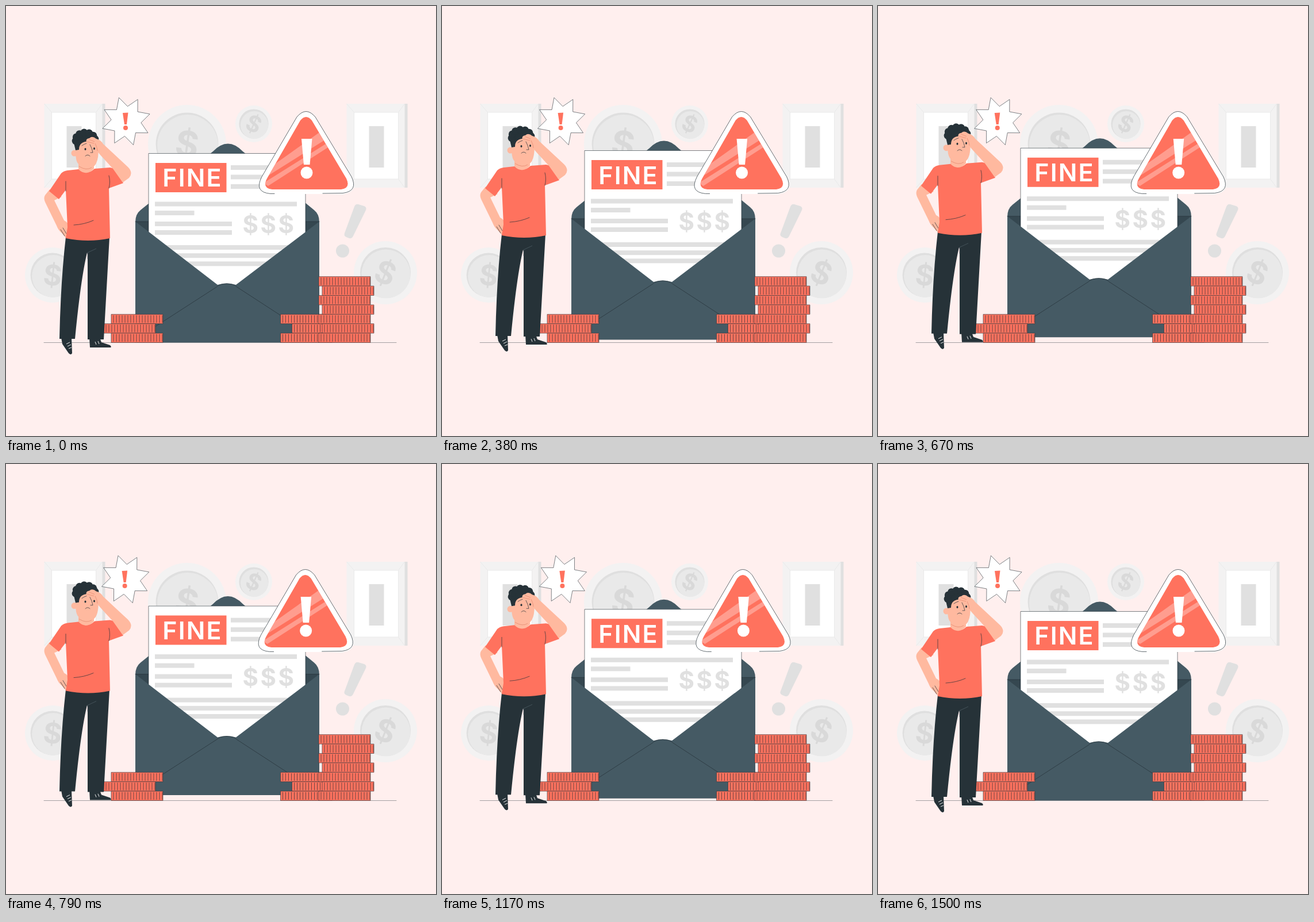
Animation of 748x748 px, one loop 1540 ms. Source, as an HTML page:

```html
<!DOCTYPE html>
<html lang="en">
<head>
<meta charset="utf-8">
<title>Fine notice</title>
<style>
html, body { margin: 0; width: 100%; height: 100%; overflow: hidden; background: #ffefee; }
svg { display: block; width: 100vw; height: 100vh; }
text { font-family: Inter, "Open Sans", sans-serif; text-anchor: middle; }
.red { fill: #ff725e; }
.dark { fill: #263238; }
.slate { fill: #455a64; }
.skin { fill: #ffb99f; }
.grey { fill: #e0e0e0; }
.white { fill: #fff; }
.line { fill: none; stroke: #263238; stroke-width: .7; stroke-linecap: round; stroke-linejoin: round; }
.edge { stroke: #263238; stroke-width: .6; stroke-linejoin: round; }
</style>
</head>
<body>
<svg viewBox="0 0 748 748" xmlns="http://www.w3.org/2000/svg">
  <defs>
    <g id="frame">
      <path class="grey" d="M100 170h6v146h-6z"/>
      <path fill="#f3f2f2" d="M0 170h101v146H0z"/>
      <path class="white" d="M13 185h77v116H13z"/>
      <path fill="none" stroke="#e6e6e6" stroke-width=".8" d="M0 170l13 15h77l11-15M0 316l13-15h77l11 15M13 185v116M90 185v116"/>
      <path class="grey" d="M39 209h26v72H39z"/>
    </g>
    <clipPath id="sign"><path id="signShape" d="M512 199Q522 187 532 199L592 300Q600 317 583 319H463Q445 317 454 300Z"/></clipPath>
  </defs>

  <use href="#frame" x="66.500"/>
  <use href="#frame" x="592.500"/>
  <g id="medals"></g>
  <path class="grey" d="M606 349Q608 344 613 345L623 348Q628 350 626 355L604 400Q602 405 597 404L592 402Q587 400 589 395Z"/>
  <circle class="grey" cx="585.500" cy="426" r="11.500"/>
  <path class="line" d="M66 585.500H679" stroke-opacity=".6"/>

  <g class="float">
    <path class="slate" d="M225 376Q225 362 234 355L360 253Q386 226 412 253L536 355Q545 362 545 376V400H225Z"/>
    <path fill="#354750" d="M225 375H545L520 400H250Z"/>
    <path class="line" d="M225 375H545"/>
    <path class="white edge" d="M248 256.500H521V500H248Z"/>
    <path class="red" d="M260 273H383.500V324H260Z"/>
    <text class="white" x="324.500" y="314.500" font-size="43" font-weight="600" letter-spacing="2.200">FINE</text>
    <g id="bars" class="grey"></g>
    <text class="grey" x="458" y="395" font-size="42" font-weight="700" letter-spacing="3.500">$$$</text>
    <path class="slate" d="M225 375L368 485Q384 480 400 485L545 375V585.500H225Z"/>
    <path class="line" d="M225 580L366 489Q372 483 384 483Q396 483 402 489L545 582"/>
  </g>

  <g id="coins"></g>

  <g class="float">
    <path class="skin" d="M76 319L68 329Q65 334 68 341L88 382Q91 390 97 395L104 403H112L111 388Q110 377 101 373L84 338L97 332Z"/>
    <path class="line" d="M95 389l7 11M99 386l6 10"/>
    <path class="dark" d="M96 577H114L115 604Q113 608 109 604L98 588ZM145 577H163L166 585L181 590Q184 593 182 594H146Z"/>
    <path d="M105 588l6-3M107 592l6-3M109 596l5-2M155 584l2 5M160 583l2 5" fill="none" stroke="#fff" stroke-width=".9"/>
    <path class="dark" d="M104 402H180L170 580H142V432L141 429L139 438Q129 485 120 579H93Q95 480 104 402Z"/>
    <path fill="none" stroke="#516068" stroke-width=".7" d="M142 440V429L157 422"/>
    <path class="skin" d="M126 270H153V283Q140 297 126 286Z"/>
    <path class="red" d="M126 284Q139 297 154 283L181 281Q190 282 195 291L204 308L179 317L181 404Q143 412 104 404L107 385L104 320L92 336L75 322L96 291Q100 287 107 286Z"/>
    <path class="line" d="M104 305V322M179 295Q182 306 179 317M118 381Q136 380 152 373"/>
    <path class="skin" d="M122 240Q119 268 126 275Q142 288 154 278Q163 268 160 238L150 228H126Z"/>
    <circle class="skin" cx="119" cy="256" r="5.500"/>
    <g id="hair" class="dark"><path d="M117 234L130 219L158 224L160 234L138 236Q127 238 127 250L121 251Z"/></g>
    <path class="skin" d="M140 237Q138 231 145 230Q150 225 157 231Q165 233 169 240L212 280Q222 290 214 299L203 307L186 283L164 259Q156 250 157 246L143 242Z"/>
    <path fill="none" stroke="#e58c73" stroke-width=".8" d="M141 236l12 3M144 232l10 4M155 239q4 8 4 13M127 279Q140 287 149 281"/>
    <ellipse class="dark" cx="138" cy="249" rx="1.500" ry="2"/>
    <ellipse class="dark" cx="153.500" cy="248" rx="1.500" ry="2"/>
    <path class="line" stroke-width="1" d="M132 243Q136 240 140 239M146 241Q150 248 151 255H147M138 261Q142 257 146 261"/>
  </g>

  <g class="shake">
    <path class="white" d="M506 193Q522 174 538 193L601 297Q614 324 585 327H460Q431 324 445 297Z"/>
    <path class="line" d="M467 326.500H460Q431 324 445 297L506 193Q522 174 538 193L601 297Q613 322 586 325.500L551 326"/>
    <use href="#signShape" class="red"/>
    <path clip-path="url(#sign)" fill="#fff" opacity=".3" d="M462 279L545 220L553 234L450 299ZM448 308L556 240L560 246L456 313Z"/>
    <path class="white" d="M514 231H532.500L528.500 276H518Z"/>
    <circle class="white" cx="523" cy="290" r="10.500"/>
  </g>
  <g class="shake">
    <path id="burst" class="white edge"/>
    <path class="red" d="M203 186L212.500 185.500L210 206H206Z"/>
    <circle class="red" cx="208" cy="212" r="4"/>
  </g>
</svg>
<script>
const NS = 'http://www.w3.org/2000/svg';
const byId = id => document.getElementById(id);

function add(parent, tag, attrs) {
  const el = document.createElementNS(NS, tag);
  for (const k in attrs) el.setAttribute(k, attrs[k]);
  parent.appendChild(el);
  return el;
}

function medal(cx, cy, r, turn) {
  const g = add(byId('medals'), 'g', { transform: `translate(${cx} ${cy})` });
  const inner = r * .8, size = 18 + r * .65;
  add(g, 'circle', { r, fill: '#f3f2f2' });
  add(g, 'circle', { r: inner, fill: '#dfdfdf' });
  add(g, 'circle', { r: inner - 1.5, cx: 1, cy: 2, fill: '#e9e9e9' });
  add(g, 'text', {
    y: size * .36, fill: '#d9d9d9', 'font-size': size, 'font-weight': 700,
    transform: `rotate(${turn})`
  }).textContent = '$';
}

medal(315, 240, 68, 8);
medal(431, 205, 32, 24);
medal(81, 468, 48, 6);
medal(660, 464, 55, 22);

function bars(x, y, width, count = 1, step = 15) {
  for (let i = 0; i < count; i++) {
    add(byId('bars'), 'rect', { x, y: y + i * step, width, height: 8 });
  }
}

bars(391, 277, 75, 3, 16.5);
bars(259, 340.5, 247);
bars(259, 356, 68.5);
bars(259, 375, 134, 2);
bars(259, 416, 247, 3, 14.2);

const COIN_W = 90, COIN_H = 16.4, FLOOR = 585.5;

function coin(x, y) {
  const g = byId('coins');
  add(g, 'rect', { x, y, width: COIN_W, height: COIN_H, class: 'red edge' });
  let d = '';
  for (let px = x + 4; px < x + COIN_W; px += 5) d += `M${px} ${y + 2}v${COIN_H - 4}`;
  add(g, 'path', { d, class: 'line' });
}

// Every second coin sits shifted sideways.
function pile(x, count, shift) {
  for (let i = 0; i < count; i++) coin(x + i % 2 * shift, FLOOR - (count - i) * COIN_H);
}

pile(183, 3, -13);
pile(477.5, 3, 20);
pile(544, 7, 6);

for (let i = 0; i < 7; i++) {
  const a = Math.PI * (.96 + i / 6);
  add(byId('hair'), 'circle', { cx: 138 + 17 * Math.cos(a), cy: 233 + 13 * Math.sin(a), r: 6.5 });
}

let star = '';
for (let i = 0; i < 16; i++) {
  const a = (i * 22.5 - 107) * Math.PI / 180, r = i % 2 ? 26 : 43;
  star += `${i ? 'L' : 'M'}${209 + r * Math.cos(a)} ${200.5 + r * Math.sin(a)}`;
}
byId('burst').setAttribute('d', star + 'Z');

const LOOP = 1540, STEP = 1000 / 24, CYCLE = 36;
const ease = p => (1 - Math.cos(Math.PI * p)) / 2;

// Swings alternate sides, doubling up to 4 and fading the same way.
function swing(k) {
  const size = Math.min(4, Math.floor(2 ** (Math.min(k, 10 - k) - 1)));
  return k % 2 ? -size : size;
}

function shakeAt(u) {
  const k = Math.floor(u * 10), from = swing(k);
  return .8 * (from + (swing(k + 1) - from) * ease(u * 10 - k));
}

function move(name, x, y) {
  for (const g of document.querySelectorAll(name)) {
    g.setAttribute('transform', `translate(${x.toFixed(2)} ${y.toFixed(2)})`);
  }
}

function draw(ms) {
  const n = Math.floor((ms % LOOP + 4) / STEP);
  const u = (n + .3) / CYCLE % 1;
  move('.float', 0, -9.5 * ease(2 * u));
  move('.shake', shakeAt(u), 0);
}

const start = performance.now();
function tick() {
  draw(performance.now() - start);
  requestAnimationFrame(tick);
}
draw(0);
requestAnimationFrame(tick);
</script>
</body>
</html>
```
